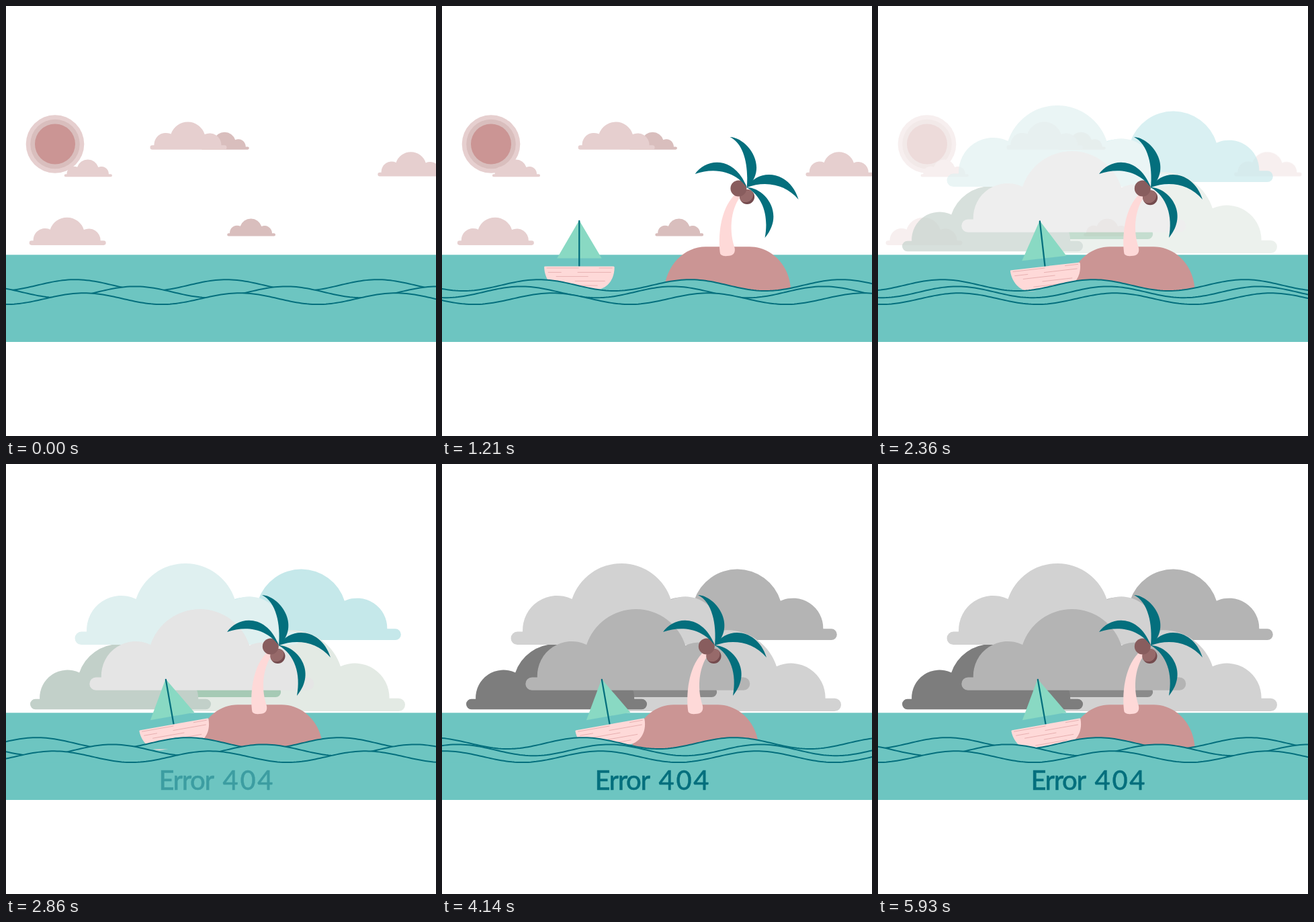
Animation of 640x640 px, one loop 6 s. Source, as an HTML page:

```html
<!DOCTYPE html>
<html lang="en">
<head>
<meta charset="utf-8">
<title>Error 404</title>
<style>
  html, body { margin: 0; width: 100%; height: 100%; overflow: hidden; background: #fff; }
  svg { display: block; width: 100%; height: 100%; }
  .leaf, #label { fill: #046f7d; }
  #label { font: 500 40px Lato, sans-serif; stroke: #046f7d; stroke-width: .4; }
  .wave { fill: #6dc5c1; }
  .crest { fill: none; stroke: #046f7d; stroke-width: 2; }
</style>
</head>
<body>
<svg viewBox="0 0 640 640">
  <defs>
    <path id="cloud" d="M6 35.4A17.5 17.5 0 0 1 31 18.8A26.4 26.4 0 0 1 81.2 19.2A17.5 17.5 0 0 1 106 35.4H110.7A3.3 3.3 0 0 1 110.7 42H3.3A3.3 3.3 0 0 1 3.3 35.4Z"/>
    <clipPath id="nut"><circle cx="406.5" cy="284" r="11"/></clipPath>
  </defs>
  <g id="fair">
    <circle cx="73" cy="205.5" r="43.3" fill="#e6cfcf"/>
    <circle cx="73" cy="205.5" r="36.8" fill="#d9bebd"/>
    <circle cx="73" cy="205.5" r="30" fill="#cb9594"/>
    <g id="drift"></g>
  </g>
  <g id="storm"></g>
  <rect y="370.3" width="640" height="129.7" fill="#6dc5c1"/>

  <g id="island">
    <path fill="#cb9594" d="M283 424C285 386 313 358.3 345 358.3H410C444 358.3 471 388 471.5 424Z"/>
    <path fill="#fed9d8" d="M366 366C363 335 369 298 390 279L398 282C384 298 378 330 388 360Q390 372 377 372Q366 373 366 366Z"/>
    <g id="coconut">
      <circle cx="406.5" cy="284" r="11" fill="#744b4e"/>
      <circle cx="404" cy="280.5" r="11.5" fill="#976a6a" clip-path="url(#nut)"/>
    </g>
    <circle cx="393.8" cy="271.5" r="12" fill="#885d5e"/>
    <g class="leaf">
      <path d="M381 195C407 196 440 240 406 271C409 238 402 205 381 195Z"/>
      <path d="M329 250C345 226 388 222 406 270C388 245 357 240 329 250Z"/>
      <path d="M406 270C424 240 470 245 483 288C463 264 432 260 406 270Z"/>
      <path d="M406 270C432 270 464 308 433 345C439 312 430 284 406 270Z"/>
    </g>
  </g>

  <g id="boat">
    <path fill="#89d9c3" d="M246.5 319L213.5 375.5H280Z"/>
    <path stroke="#046f7d" stroke-width="2.3" stroke-linecap="round" d="M246.6 320V387"/>
    <path fill="#fed9d8" d="M194.5 388.5Q194.5 387.5 196 387.5H297.5Q299 387.5 299 389C299 409 286 422.3 270 422.3H224C206 422.3 194.5 405 194.5 388.5Z"/>
    <path stroke="#e3a9aa" stroke-width=".8" d="M198 390H246M276 390H296M200 396.4H220M244 396.4H294M212 402.6H260M240 409.4H285M226 416H274"/>
  </g>

  <g id="sea"></g>
  <g id="label">
    <text x="227.5" y="485" letter-spacing="-1.5">Error</text>
    <text x="322.5" y="485" letter-spacing="2.7">404</text>
  </g>
</svg>
<script>
const LOOP = 6000;
const WAVE_LEAD = 20;
const $ = id => document.getElementById(id);

function add(parent, tag, attrs) {
  const node = document.createElementNS('http://www.w3.org/2000/svg', tag);
  for (const key in attrs) node.setAttribute(key, attrs[key]);
  return parent.appendChild(node);
}

const addCloud = (parent, x, y, scale, fill) => add(parent, 'use', {
  href: '#cloud', fill, transform: `translate(${x} ${y}) scale(${scale})`
});

const PALE = '#e6cfcf', DUSK = '#d9bebd';
[
  [290, 187.2, .63, DUSK], [214.5, 171.8, 1, PALE], [86.7, 228, .625, PALE],
  [553.3, 216.5, .88, PALE], [34.7, 313.9, 1, PALE], [329.2, 316, .63, DUSK]
].forEach(c => addCloud($('drift'), ...c));

// Each storm cloud: x, y, scale, first colour, final grey level
const storm = [
  [296, 154.6, 2.56, [197, 233, 235], 180],
  [260, 245, 2.93, [227, 234, 228], 210],
  [139, 247.5, 2.37, [166, 203, 182], 138],
  [36, 266.2, 2.36, [195, 209, 202], 125],
  [102.5, 145.7, 2.935, [223, 240, 240], 210],
  [124.3, 213.8, 2.93, [230, 230, 230], 180]
].map(([x, y, s, from, grey]) => ({ from, grey, node: addCloud($('storm'), x, y, s) }));

// Each wave: crest position, travel, wavelength, mid height
const waves = [
  [103, -509, 225, 415.6],
  [192, 418, 225, 425.8],
  [116, -511, 232, 435.7]
].map(([x, travel, length, y]) => ({
  x, travel, length, y,
  fill: add($('sea'), 'path', { class: 'wave' }),
  crest: add($('sea'), 'path', { class: 'crest' })
}));

const swing = u => (1 - Math.cos(Math.PI * u)) / 2;
const ease = (t, start, end) => swing(Math.min(1, Math.max(0, (t - start) / (end - start))));

function draw(t) {
  const arrive = 1 - ease(t, 0, 1580);
  const gloom = ease(t, 2000, 2600);
  const dark = ease(t, 2830, 3220);

  $('drift').setAttribute('transform', `translate(${-t * .0098} 0)`);
  $('fair').setAttribute('opacity', 1 - gloom);
  $('storm').setAttribute('opacity', gloom);
  for (const { from, grey, node } of storm) {
    node.setAttribute('fill', `rgb(${from.map(v => Math.round(v + (grey - v) * dark))})`);
  }

  $('island').setAttribute('transform', `translate(${370 * arrive} 0)`);
  $('coconut').setAttribute('transform', `translate(${-2 * gloom} ${2 * gloom})`);
  $('boat').setAttribute('transform', `translate(${-329 * arrive} 0) rotate(${-10 * gloom} 247.5 370.5)`);
  $('label').setAttribute('opacity', ease(t, 2600, 3150));

  const sweep = swing(2 * (t + WAVE_LEAD) / LOOP);
  for (const w of waves) {
    const peak = w.x + w.travel * sweep;
    let line = '';
    for (let x = -4; x <= 644; x += 4) {
      const y = w.y - 8.4 * Math.cos((x - peak) / w.length * 2 * Math.PI);
      line += `${line ? 'L' : 'M'}${x} ${y.toFixed(2)}`;
    }
    w.crest.setAttribute('d', line);
    w.fill.setAttribute('d', `${line}V${w.y + 8.9}H-4Z`);
  }
}

const begin = performance.now();
function tick() {
  draw((performance.now() - begin) % LOOP);
  requestAnimationFrame(tick);
}
tick();
</script>
</body>
</html>
```
